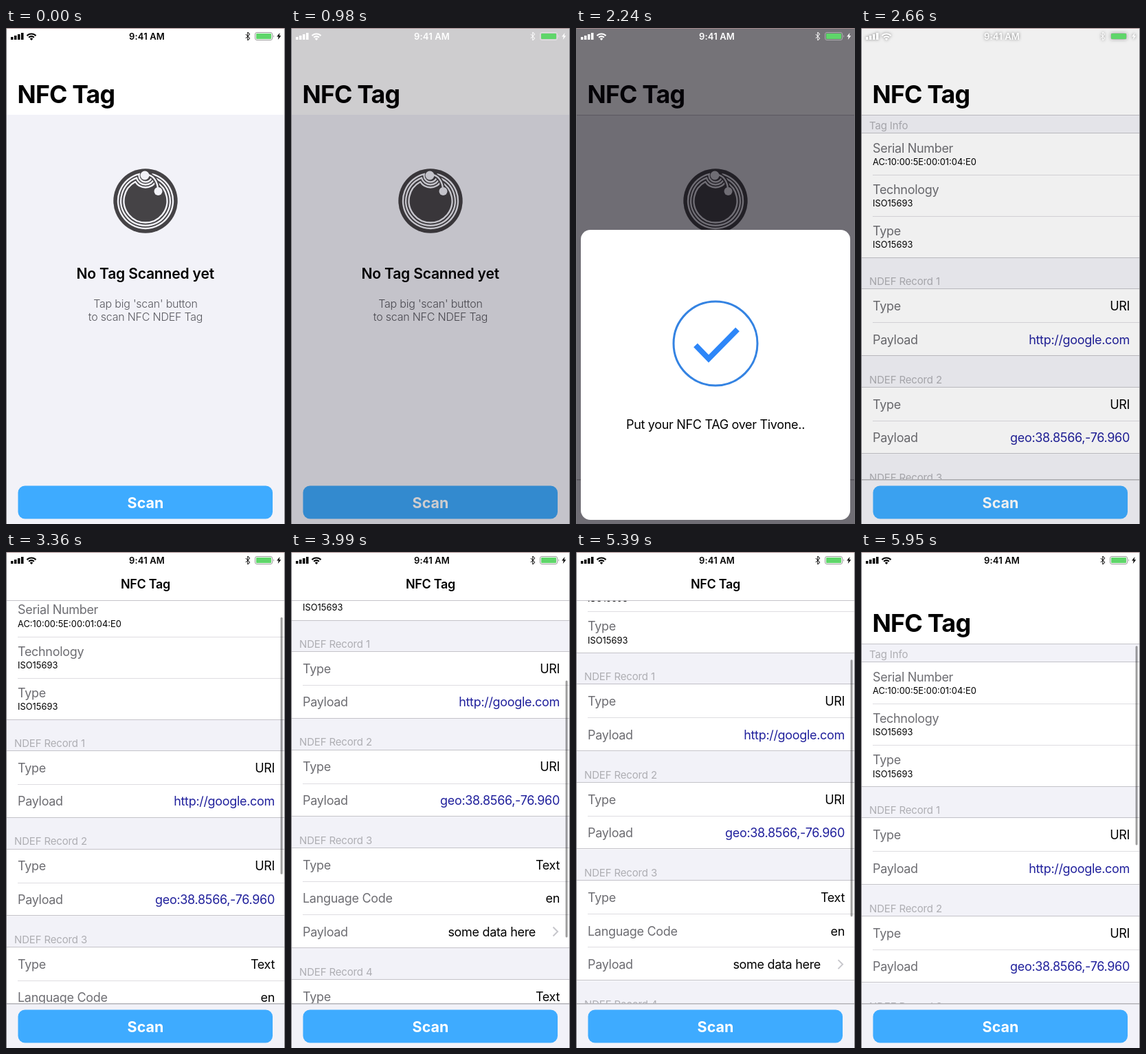
Animation of 406x720 px, one loop 6.02 s. Source, as an HTML page:

```html
<!DOCTYPE html>
<html lang="en">
<head>
<meta charset="utf-8">
<title>NFC Tag</title>
<style>
  html, body { margin: 0; width: 100%; height: 100%; overflow: hidden; background: #f2f2f8; }
  svg { display: block; width: 406px; height: 720px; font-family: Inter, "Liberation Sans", sans-serif; }
  .body { font-size: 18px; letter-spacing: -.0175em; }
  .label { fill: #6d6d72; }
  .small { font-size: 12.900px; }
  .head { font-size: 15px; letter-spacing: -.01em; fill: #aeaeb3; }
  .link { fill: #20209c; }
  .mid { text-anchor: middle; }
  .end { text-anchor: end; }
  .line { fill: #c4c3c9; shape-rendering: crispEdges; }
  .thin { fill: #dedde1; shape-rendering: crispEdges; }
</style>
</head>
<body>
<svg viewBox="0 0 406 720">
  <defs><clipPath id="below"><rect y="70" width="406" height="80"/></clipPath></defs>
  <rect width="406" height="720" fill="#f2f2f8"/>

  <g id="empty">
    <g id="coil" transform="translate(203 251)" fill="none" stroke="#f2f2f8" stroke-width="2.400">
      <circle r="46.700" fill="#454346" stroke="none"/>
    </g>
    <text class="mid" x="202.700" y="363.500" font-size="21.100" font-weight="600" letter-spacing="-.01em">No Tag Scanned yet</text>
    <g class="mid" font-size="16" font-weight="300" letter-spacing="-.014em" fill="#5a5a60">
      <text x="203" y="406">Tap big 'scan' button</text>
      <text x="203" y="425">to scan NFC NDEF Tag</text>
    </g>
  </g>

  <g id="list"></g>

  <rect id="nav" width="406" fill="#fff"/>
  <rect id="navLine" class="line" width="406" height="1"/>
  <g clip-path="url(#below)">
    <text id="large" font-size="35.700" font-weight="700" letter-spacing="-.023em">NFC Tag</text>
  </g>
  <text id="compact" class="body mid" x="203" y="53" font-weight="600">NFC Tag</text>

  <rect id="bar" x="399.500" width="3" rx="1.500" fill="#000"/>
  <rect y="656" width="406" height="64" fill="#f2f2f8"/>
  <rect id="toolLine" y="655" width="406" height="1.500" fill="#b4b3b8"/>
  <rect x="17.500" y="664.500" width="370.500" height="48" rx="10" fill="#3eabff"/>
  <text id="scan" class="mid" x="203" y="696.500" font-size="21.500" font-weight="700" fill="#fff">Scan</text>

  <rect id="dim" width="406" height="720" fill="#08050d"/>

  <g id="sheet">
    <rect x="7" y="293" width="392" height="421" rx="14" fill="#fff"/>
    <circle cx="203" cy="458" r="61" fill="none" stroke="#3483e2" stroke-width="3"/>
    <path id="check" d="M174 460.500L193 480L235 437.500" fill="none" stroke="#2d86f8" stroke-width="8" pathLength="1" stroke-dasharray="1 2"/>
    <text class="body mid" x="203" y="582">Put your NFC TAG over Tivone..</text>
  </g>

  <g id="status" fill="currentColor">
    <path d="M7 17v-4h3.500v4zM12 17v-6h3.500v6zM17 17v-8h3.500v8zM22 17v-10h3.500v10z"/>
    <path d="M30.500 11.300a9 9 0 0 1 13 0M33.200 13.800a5.200 5.200 0 0 1 7.600 0" fill="none" stroke="currentColor" stroke-width="2.200"/>
    <path d="M37 18l-2.200-2.300a3.100 3.100 0 0 1 4.400 0z"/>
    <text class="mid" x="205" y="16.700" font-size="13" font-weight="600" letter-spacing=".01em">9:41 AM</text>
    <path d="M348.800 9l6 6l-3 3v-12l3 3l-6 6" fill="none" stroke="currentColor"/>
    <g opacity=".4">
      <rect x="362.500" y="6.500" width="25" height="11" rx="2.500" fill="none" stroke="currentColor"/>
      <path d="M389 10q2 2 0 4z"/>
    </g>
    <rect x="364" y="8" width="22" height="8" rx="1" fill="#5fd66a"/>
    <path d="M398.500 7l-4.500 5.500h2.700l-1 4.500l4.500-5.800h-2.700z"/>
  </g>

  <rect width="406" height="1" fill="#a58a8c"/>
  <path d="M.5 0V720M405.500 0V720" stroke="#77767a"/>
</svg>
<script>
const LOOP = 6020, TOP = 126, COMPACT = 70, BOTTOM = 656, CONTENT = 911;
const $ = id => document.getElementById(id);
const clamp = x => Math.min(1, Math.max(0, x));
const ramp = (t, a, b) => clamp((t - a) / (b - a));
const smooth = p => (1 - Math.cos(Math.PI * p)) / 2;

function add(parent, tag, attrs, text = '') {
  const el = document.createElementNS('http://www.w3.org/2000/svg', tag);
  for (const k in attrs) el.setAttribute(k, attrs[k]);
  el.textContent = text;
  return parent.appendChild(el);
}
function set(id, attrs) {
  for (const k in attrs) $(id).setAttribute(k, attrs[k]);
}

// Antenna rings, each dented around the upper contact
for (const [R, d] of [[40, 9.5], [35.8, 13.5], [31.5, 17.5]]) {
  const c = 37, y = -(R * R + c * c - d * d) / (2 * c), x = Math.sqrt(R * R - y * y);
  add($('coil'), 'path', { d: `M${x} ${y}A${R} ${R} 0 1 1 ${-x} ${y}A${d} ${d} 0 ${y < -c ? 1 : 0} 0 ${x} ${y}` });
}
const lead = 'M0 -38C11 -39 18 -28 18.500 -14';
add($('coil'), 'path', { d: lead, stroke: '#454346', 'stroke-width': 6 });
add($('coil'), 'path', { d: lead });
for (const [cx, cy, r] of [[-1, -37, 6.5], [18.5, -14, 6]])
  add($('coil'), 'circle', { cx, cy, r, fill: '#f2f2f8', stroke: 'none' });

// Table sections
const list = $('list');
const text = (cls, x, y, s) => add(list, 'text', { class: cls, x, y }, s);
const rect = (cls, x, y, h) => add(list, 'rect', { class: cls, x, y, width: 406 - x, height: h });

function section(y, title, gap, rows, rowHeight, drawRow) {
  text('head', 12, y + gap - 6, title);
  const top = y + gap, height = rows.length * rowHeight;
  rect('', 0, top, height).setAttribute('fill', '#fff');
  rows.forEach((row, i) => {
    if (i) rect('thin', 17, Math.floor(top + i * rowHeight), 1);
    drawRow(row, top + i * rowHeight);
  });
  rect('line', 0, Math.floor(top - .5), 1);
  rect('line', 0, Math.floor(top + height - .5), 1);
  return top + height;
}

let y = section(TOP, 'Tag Info', 27, [
  ['Serial Number', 'AC:10:00:5E:00:01:04:E0'], ['Technology', 'ISO15693'], ['Type', 'ISO15693']
], 60.2, ([label, value], top) => {
  text('body label', 17, top + 27.5, label);
  text('small', 17, top + 46, value);
});

const note = [['Type', 'Text'], ['Language Code', 'en'], ['Payload', 'some data here', 'more']];
const records = [
  [['Type', 'URI'], ['Payload', 'http://google.com', 'link']],
  [['Type', 'URI'], ['Payload', 'geo:38.8566,-76.960', 'link']],
  note, note
];
records.forEach((rows, i) => {
  y = section(y, `NDEF Record ${i + 1}`, 45.6, rows, 48.4, ([label, value, kind], top) => {
    text('body label', 17, top + 31, label);
    text(`body end ${kind || ''}`, kind === 'more' ? 356 : 391, top + 31, value);
    if (kind === 'more')
      add(list, 'path', { d: `M381.500 ${top + 18}l6.500 6.500l-6.500 6.500`, fill: 'none', stroke: '#c7c7cc', 'stroke-width': 2 });
  });
});

// Scroll offset: a smooth curve through [time, offset]
const drag = [[2730, 0], [3360, 90], [3990, 234], [4640, 381], [5390, 187], [5950, -7], [6020, -6]];
function scrollAt(t) {
  const i = drag.findIndex(p => p[0] > t);
  if (i < 1) return 0;
  const slope = k => k < 1 || k > drag.length - 2 ? 0
    : (drag[k + 1][1] - drag[k - 1][1]) / (drag[k + 1][0] - drag[k - 1][0]);
  const [t0, a] = drag[i - 1], [t1, b] = drag[i], d = t1 - t0, p = (t - t0) / d, q = 1 - p;
  return a * q * q * (1 + 2 * p) + b * p * p * (3 - 2 * p) + d * p * q * (q * slope(i - 1) - p * slope(i));
}

function draw() {
  const t = performance.now() % LOOP;
  const off = scrollAt(t), navH = Math.max(COMPACT, TOP - off);

  // Page
  const scanned = t >= 2310, lines = t >= 1470 ? 1 : 0;
  set('empty', { visibility: scanned ? 'hidden' : 'visible' });
  set('list', { visibility: scanned ? 'visible' : 'hidden', transform: `translate(0 ${-off})` });
  set('nav', { height: navH });
  set('navLine', { y: navH, opacity: lines });
  set('toolLine', { opacity: lines });
  set('large', { transform: `translate(16.5 ${109 - off}) scale(${1 + Math.max(0, -off) * .001})` });
  set('compact', { opacity: clamp((off - 40) / 15) });
  set('scan', { opacity: 1 - .5 * ramp(t, 530, 600) * (1 - ramp(t, 630, 720)) });

  // Scroll indicator
  const view = BOTTOM - navH, ratio = (view - 6) / CONTENT;
  set('bar', {
    y: navH + 3 + (off - TOP + navH) * ratio,
    height: view * ratio + Math.min(0, off),
    opacity: .38 * ramp(t, 2760, 2940)
  });

  // Sheet
  const rise = 1 - (1 - ramp(t, 990, 1500)) ** 3, fall = smooth(ramp(t, 2240, 2620));
  set('dim', { opacity: .56 * (smooth(ramp(t, 812, 1230)) - smooth(ramp(t, 2210, 2780))) });
  set('sheet', { transform: `translate(0 ${430 * (1 - rise + fall)})` });
  set('check', { 'stroke-dashoffset': 1 - smooth(ramp(t, 1500, 1820)), opacity: t > 1500 ? 1 : 0 });

  const light = t >= 900 && t < 2730;
  $('status').style.color = light ? '#fff' : '#000';
  $('status').style.filter = light && t > 2450 ? 'drop-shadow(0 0 2px #777)' : 'none';

  requestAnimationFrame(draw);
}
draw();
</script>
</body>
</html>
```
